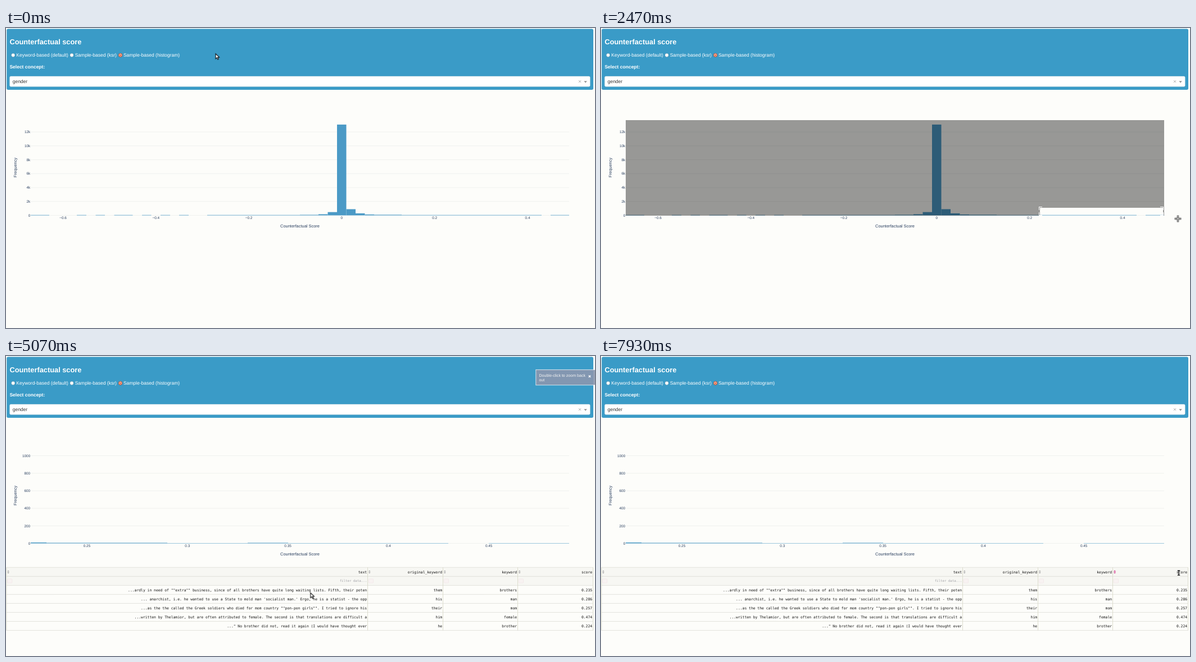
Recreate the animation shown at these times as an HTML page. Size 1048 px wide and 534 px high, loop 8000 ms.

```html
<!DOCTYPE html>
<html lang="en">
<head>
<meta charset="utf-8">
<title>Counterfactual score</title>
<style>
  html, body { margin: 0; width: 100%; height: 100%; overflow: hidden; background: #fdfdfa; }
  #stage { position: absolute; left: 0; top: 0; width: 1048px; height: 534px; overflow: hidden; }
  svg { position: absolute; left: 0; top: 0; }
  text { font-family: "Liberation Sans", Arial, sans-serif; text-rendering: geometricPrecision; white-space: pre; }
  .head text { font-size: 8.5px; fill: #fff; }
  .head .title { font-size: 12.8px; font-weight: bold; }
  .head .label { font-weight: bold; }
  .head .value { fill: #333; }
  .chart text { font-size: 6.4px; fill: #2a3f5f; }
  .chart .axis { font-size: 7.45px; }
  #table text { font: 6.375px "DejaVu Sans Mono", monospace; fill: #111; text-anchor: end; }
  #table .hint { font-size: 5.76px; fill: #a3a3a8; }
  .note text { font-size: 7.09px; fill: #f4f4f4; }

  .anim { animation: 8s linear infinite; }
  .hard { animation: 8s step-end infinite; }

  #full { animation-name: full; }
  #zoomed { animation-name: zoomed; }
  @keyframes full { 0% { opacity: 1 } 42.5%, 100% { opacity: 0 } }
  @keyframes zoomed { 0% { opacity: 0 } 42.5%, 100% { opacity: 1 } }

  #modebar { animation-name: modebar; }
  @keyframes modebar {
    0%, 4.5% { opacity: 0 } 8.25%, 22.4% { opacity: 1 } 25%, 43% { opacity: 0 }
    46.5%, 56.2% { opacity: 1 } 59.5%, 100% { opacity: 0 }
  }

  /* drag-to-zoom shading: the hole's shadow darkens the rest of the plot */
  #pane { position: absolute; left: 44px; top: 163.5px; width: 958px; height: 170.5px; overflow: hidden; animation-name: pane; }
  @keyframes pane { 0%, 21.25% { opacity: 0 } 23.75%, 42.49% { opacity: 1 } 42.5%, 100% { opacity: 0 } }
  .phase { position: absolute; inset: 0; }
  #wide { animation-name: wide; }
  #tight { animation-name: tight; }
  @keyframes wide { 0% { opacity: 1 } 26.25%, 100% { opacity: 0 } }
  @keyframes tight { 0% { opacity: 0 } 26.25%, 100% { opacity: 1 } }
  .hole { position: absolute; left: 736.8px; top: 0; height: 170.5px; box-shadow: 0 0 0 1200px rgba(0,0,0,.4); animation-name: grow; }
  #tight .hole { top: 156px; animation-name: grow, drop; }
  @keyframes grow { 0%, 21.25% { width: 0 } 29.06%, 100% { width: 219px } }
  @keyframes drop { 0%, 26.25% { height: 11.6px } 27.3%, 100% { height: 14px } }
  .hole i { position: absolute; box-sizing: border-box; width: 6px; height: 6px; border: 0 solid #fff; filter: drop-shadow(0 0 .6px #333) drop-shadow(0 0 .4px #333); }
  .hole .l { left: -1.5px; border-left-width: 1.5px; }
  .hole .r { right: -1.5px; border-right-width: 1.5px; }
  .hole .t { top: -1.5px; border-top-width: 1.5px; }
  .hole .b { bottom: -.5px; border-bottom-width: 1.5px; }
  #wide i { top: 145px; height: 22px; }

  #table { animation-name: table; }
  @keyframes table { 0% { opacity: 0 } 49.4%, 100% { opacity: 1 } }
  #filterHover { animation-name: filterHover; }
  @keyframes filterHover { 0% { opacity: 0 } 80.25% { opacity: 1 } 90.6%, 100% { opacity: 0 } }
  #sortHover { animation-name: sortHover; }
  @keyframes sortHover { 0% { opacity: 0 } 95%, 100% { opacity: 1 } }

  .note { animation-name: note; }
  @keyframes note { 0%, 43.1% { opacity: 0 } 51.9%, 89.4% { opacity: 1 } 98.1%, 100% { opacity: 0 } }

  #cursor { animation-name: move; }
  @keyframes move {
    0%, 1% { transform: translate(373px, 45.7px); animation-timing-function: ease-in-out }
    11.25%, 17.5% { transform: translate(779.5px, 329px) }
    20%, 21.25% { transform: translate(780.5px, 320px) }
    30%, 36% { transform: translate(1026.5px, 339.5px); animation-timing-function: ease-in-out }
    42%, 53% { transform: translate(1035.5px, 348.5px); animation-timing-function: ease-in-out }
    62.5%, 64.5% { transform: translate(541.8px, 421.5px); animation-timing-function: ease-in-out }
    72% { transform: translate(700px, 490px); animation-timing-function: ease-in-out }
    81%, 86.5% { transform: translate(864px, 400.5px); animation-timing-function: ease-in-out }
    97%, 100% { transform: translate(1028px, 386px) }
  }
  #arrow { animation-name: arrow; }
  #cross { animation-name: cross; }
  #beam { animation-name: beam; }
  @keyframes arrow { 0% { opacity: 1 } 5.75% { opacity: 0 } 39% { opacity: 1 } 80%, 100% { opacity: 0 } }
  @keyframes cross { 0% { opacity: 0 } 5.75% { opacity: 1 } 39%, 100% { opacity: 0 } }
  @keyframes beam { 0% { opacity: 0 } 80%, 100% { opacity: 1 } }
</style>
</head>
<body>
<div id="stage">
  <svg width="1048" height="534">
    <g class="head">
      <rect x="1.2" y="1.5" width="1043.8" height="108.5" rx="2.7" fill="#3a9bc7"/>
      <text class="title" x="6.4" y="29.3">Counterfactual score</text>
      <g fill="#fff" stroke="#7d8f99" stroke-width=".4">
        <circle cx="12.7" cy="48.3" r="3.1"/>
        <circle cx="117" cy="48.3" r="3.1"/>
      </g>
      <circle cx="203.5" cy="48.3" r="2.8" fill="#fff" stroke="#d9481c" stroke-width="1.1"/>
      <circle cx="203.5" cy="48.3" r="1.4" fill="#d9481c"/>
      <text x="18.3" y="51.2">Keyword-based (default)</text>
      <text x="122.7" y="51.2">Sample-based (ksr)</text>
      <text x="208.9" y="51.2">Sample-based (histogram)</text>
      <text class="label" x="6.4" y="72.3">Select concept:</text>
      <rect x="6.6" y="86" width="1032.6" height="18.3" rx="2" fill="#fff" stroke="#d5dde0" stroke-width=".5"/>
      <text class="value" x="11.7" y="98.1">gender</text>
      <path d="M1019 93.2l4 4m0-4l-4 4" stroke="#999" stroke-width=".8"/>
      <path d="M1028.4 94.6h5.4l-2.7 2.8z" fill="#888"/>
    </g>

    <g class="chart">
      <g id="full" class="hard"></g>
      <g id="zoomed" class="hard"></g>
      <text class="axis" x="523" y="355.1" text-anchor="middle">Counterfactual Score</text>
      <text class="axis" transform="translate(19 248.4) rotate(-90)" text-anchor="middle">Frequency</text>
    </g>

    <g id="modebar" class="anim" fill="#c3c3c0" stroke="#c3c3c0" stroke-width="0">
      <path d="M905.3 114.3h2l.8-1.4h2.8l.8 1.4h2v6h-8.4z"/>
      <circle cx="909.5" cy="117.2" r="1.9" fill="#fdfdfa"/>
      <circle cx="909.5" cy="117.2" r="1.1"/>
      <g fill="none" stroke="#777">
        <circle cx="925.8" cy="115.8" r="2.8" stroke-width="1.4"/>
        <path d="M928 118l2.5 2.6" stroke-width="1.7"/>
        <path d="M924.3 115.8h3m-1.5-1.5v3" stroke-width=".8"/>
      </g>
      <path d="M935 116.6h8.4M939.2 112.4v8.4" stroke-width="1"/>
      <path d="M934.7 116.6l1.8-1.7v3.4zm9 0l-1.8-1.7v3.4zm-4.5-4.5l-1.7 1.8h3.4zm0 9l-1.7-1.8h3.4z"/>
      <rect x="948.3" y="112.7" width="7.8" height="7.8" fill="none" stroke-width="1" stroke-dasharray="1.6 .9"/>
      <path d="M963 118.6c-3-1.5-2-5.8 2.2-5.8s5 4.6 1.3 5.4c-2.5.5-3.7-.8-3.5 2.5" fill="none" stroke-width="1.1"/>
      <rect x="978" y="112.6" width="8" height="8" rx=".8"/>
      <rect x="990.6" y="112.6" width="8" height="8" rx=".8"/>
      <path d="M979.7 116.6h4.6M982 114.3v4.6M992.3 116.6h4.6" stroke="#fdfdfa" stroke-width="1.3"/>
      <path d="M1004 113l7.2 7.2m0-7.2l-7.2 7.2" stroke-width="1"/>
      <path d="M1003.4 112.4h2.8l-2.8 2.8zm8.4 0v2.8l-2.8-2.8zm0 8.4h-2.8l2.8-2.8zm-8.4 0v-2.8l2.8 2.8z"/>
      <path d="M1016 117l4.4-4 4.4 4h-1.2v3.6h-2.3v-2.4h-1.8v2.4h-2.3v-3.6z"/>
      <rect x="1033" y="112.3" width="8.6" height="8.6" fill="#252525"/>
    </g>
  </svg>

  <div id="pane" class="anim">
    <div id="wide" class="phase hard"><div class="hole anim"><i class="l"></i><i class="r"></i></div></div>
    <div id="tight" class="phase hard"><div class="hole anim"><i class="l t"></i><i class="r t"></i><i class="l b"></i><i class="r b"></i></div></div>
  </div>

  <svg width="1048" height="534">
    <g id="table" class="hard">
      <g id="cells"></g>
      <g id="filterHover" class="hard">
        <text class="hint" x="909.5" y="402.3">filter data...</text>
        <rect x="779.4" y="396.8" width="8.2" height="7.4" rx="1" fill="#fdf0f6" stroke="#e0489a" stroke-width="1"/>
        <text x="786.4" y="402.3" style="font-size:4.8px;fill:#e0489a">Aa</text>
      </g>
      <path id="sortHover" class="hard" fill="#e0489a" d="M912.2 383.9h4l-2-2.4zm0 1h4l-2 2.4z"/>
    </g>

    <g class="note anim">
      <rect x="942.8" y="24.4" width="110" height="27.4" fill="#8c97af" fill-opacity=".9" stroke="#fff" stroke-opacity=".75" stroke-width="1"/>
      <text x="948.4" y="36.9">Double-click to zoom back</text>
      <text x="948.4" y="45.4">out</text>
      <path d="M1036.7 34.4l3.6 3.6m0-3.6l-3.6 3.6" stroke="#fff" stroke-width="1.2"/>
    </g>

    <g id="cursor" class="anim">
      <path id="arrow" class="hard" d="M0 0v9l2.1-1.9 1.5 3.3 1.6-.7-1.5-3.2h2.9z" fill="#fff" stroke="#151515" stroke-width="1.1"/>
      <g id="cross" class="hard" fill="none">
        <path d="M-5.7 0h4.5M1.2 0h4.5M0-5.7v4.5M0 1.2v4.5" stroke="#222" stroke-width="3"/>
        <path d="M-4.9 0h3.2M1.7 0h3.2M0-4.9v3.2M0 1.7v3.2" stroke="#fff" stroke-width="1.1"/>
      </g>
      <g id="beam" class="hard" fill="none">
        <path d="M-2.2-4h4.4M0-4v8M-2.2 4h4.4" stroke="#fff" stroke-width="2.4"/>
        <path d="M-2.2-4h4.4M0-4v8M-2.2 4h4.4" stroke="#151515" stroke-width="1.4"/>
      </g>
    </g>
  </svg>
</div>

<script>
  const NS = 'http://www.w3.org/2000/svg';
  const LEFT = 44, RIGHT = 1002, BASE = 333.5;

  function add(parent, tag, attrs, content) {
    const el = document.createElementNS(NS, tag);
    for (const key in attrs) el.setAttribute(key, attrs[key]);
    if (content !== undefined) el.textContent = content;
    parent.appendChild(el);
  }
  const line = (g, x1, y1, x2, y2, stroke) =>
    add(g, 'line', { x1, y1, x2, y2, stroke, 'stroke-width': .8 });

  // Bars are [left, right, height] in stage pixels.
  function drawPlot(id, { yStep, yGap, yLabels, xStart, xGap, xLabels, bars }) {
    const g = document.getElementById(id);
    yLabels.forEach((label, i) => {
      const y = BASE - i * yGap;
      line(g, LEFT, y, RIGHT, y, '#ecefed');
      add(g, 'text', { x: 43.2, y: y + 2.2, 'text-anchor': 'end' }, label);
    });
    xLabels.forEach((label, i) =>
      add(g, 'text', { x: xStart + i * xGap, y: 340.4, 'text-anchor': 'middle' }, label));
    for (const [a, b, h] of bars)
      add(g, 'rect', { x: a, y: BASE - h, width: b - a, height: h, fill: '#4b9ac6' });
  }

  const thin = [[44, 77], [126, 143], [159.5, 176], [192.5, 225.5], [242, 258.5], [275, 292],
    [308, 325], [358, 523], [704, 953], [969, 1002]].map(([a, b]) => [a, b, .7]);

  drawPlot('full', {
    yGap: 24.75, yLabels: ['0', '2k', '4k', '6k', '8k', '10k', '12k'],
    xStart: 101.5, xGap: 165.3, xLabels: ['−0.6', '−0.4', '−0.2', '0', '0.2', '0.4'],
    bars: [...thin, [523, 556, 1], [556, 572.5, 2], [572.5, 589, 5.8], [589, 605.5, 161.6],
      [605.5, 622, 11], [622, 638.5, 3.6], [638.5, 655, 1.6], [655, 704, 1.1]]
  });
  drawPlot('zoomed', {
    yGap: 31.2, yLabels: ['0', '200', '400', '600', '800', '1000'],
    xStart: 144, xGap: 178.8, xLabels: ['0.25', '0.3', '0.35', '0.4', '0.45'],
    bars: [[44, 72, 1.6], [72, 287, 1], [287, 430, .5], [430, 502, 1], [502, 787, .5], [859, 1002, .5]]
  });

  const cells = document.getElementById('cells');
  const edges = [.8, 643.5, 777.5, 910.5, 1044.5];
  const rows = [
    ['text', 'original_keyword', 'keyword', 'score'],
    [],
    ['...ardly in need of ""extra"" business, since of all brothers have quite long waiting lists. Fifth, their poten', 'them', 'brothers', '0.235'],
    ["... anarchist, i.e. he wanted to use a State to mold man 'socialist man.' Ergo, he is a statist - the opp", 'his', 'man', '0.286'],
    ['...as the the called the Greek soldiers who died for mom country ""pon-pon girls"". I tried to ignore his', 'their', 'mom', '0.257'],
    ['...written by Thelamior, but are often attributed to female. The second is that translations are difficult a', 'him', 'female', '0.474'],
    ['..." No brother did not, read it again (I would have thought ever', 'he', 'brother', '0.224']
  ];
  const rowTop = i => 376.3 + i * 16.02;
  const bottom = rowTop(rows.length);

  add(cells, 'rect', { x: .8, y: rowTop(0), width: 1043.7, height: rowTop(2) - rowTop(0), fill: '#f7f7f3' });
  for (let i = 0; i <= rows.length; i++) line(cells, .8, rowTop(i), 1044.5, rowTop(i), '#dcdcd6');
  edges.forEach(x => line(cells, x, rowTop(0), x, bottom, '#d6d6c4'));
  rows.forEach((row, i) => row.forEach((value, c) =>
    add(cells, 'text', { x: edges[c + 1] - 1.4, y: rowTop(i) + 10.4 }, value)));
  edges.slice(0, 4).forEach(x => {
    const m = x + 3.3;
    add(cells, 'path', { d: `M${m - 1.8} 383.8h3.6l-1.8-2.2zm0 1.2h3.6l-1.8 2.2z`, fill: '#a2a2a2' });
    add(cells, 'rect', { x: x + 1.8, y: 396.8, width: 8.2, height: 7.2, rx: 1, fill: '#f8f3f2', stroke: '#f1e6e8', 'stroke-width': .8 });
  });
  add(cells, 'text', { class: 'hint', x: 642.1, y: 402.3 }, 'filter data...');
</script>
</body>
</html>
```
